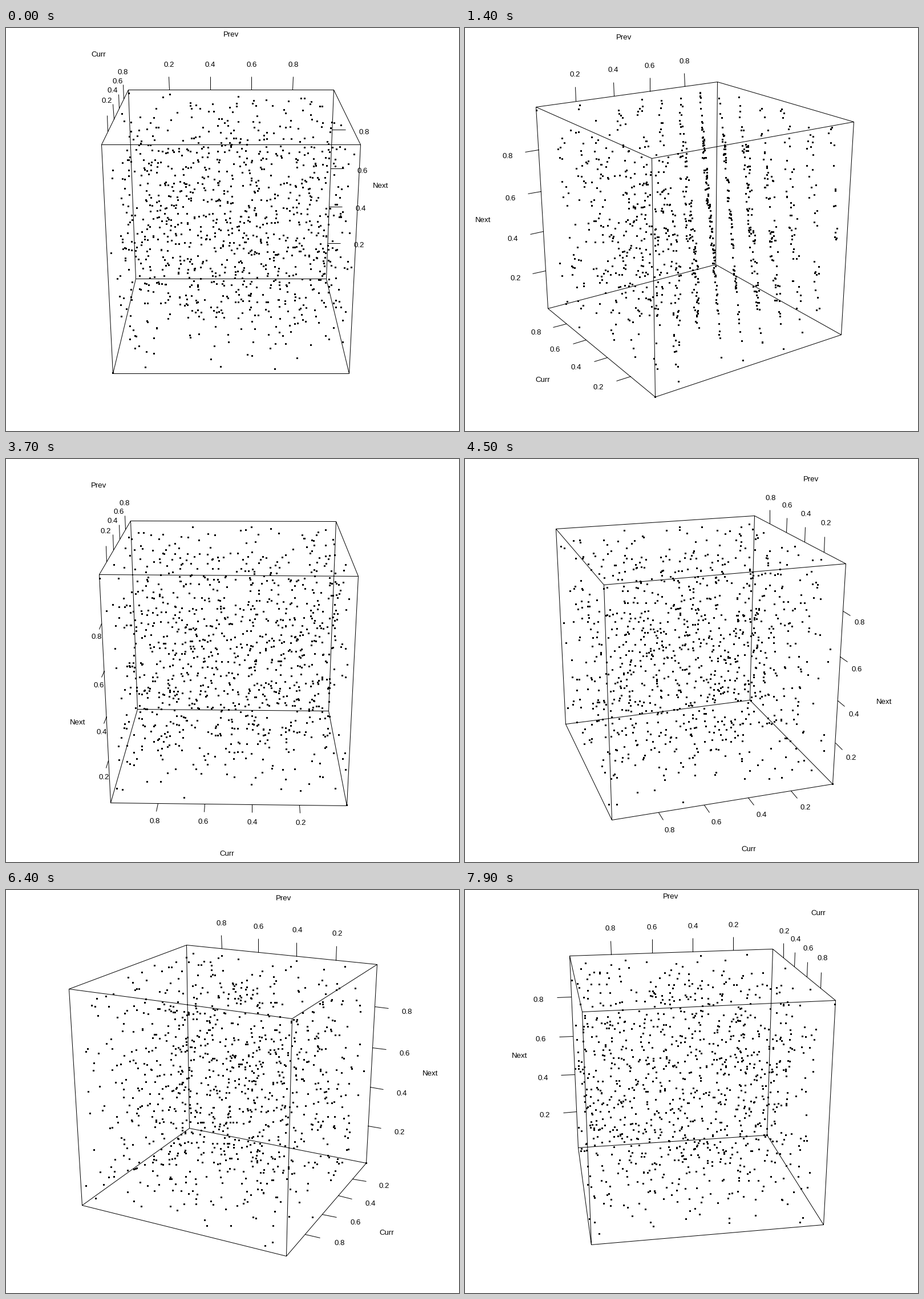
Write a matplotlib script that moves like this. It is 794 px wide and 706 px high and loops after 8 s.

```python
import itertools
import numpy as np
import matplotlib.pyplot as plt
from matplotlib.animation import FuncAnimation

W, H, DPI = 794, 706, 100
FRAMES, INTERVAL = 80, 100
STEP = 2.4                       # degrees per frame
TILT = np.radians(20)
FOCAL, DIST = 1641, 8.52
CX, CY = 394, 339.1
TICK = 2 / 15                    # tick length, the cube spans -1..1
DOT = 3                          # dot size in pixels
HALF, BASE = 9, 6.6              # half label width, baseline drop
NAMES = ("Prev", "Curr", "Next")
MARKS = (0.2, 0.4, 0.6, 0.8)


def randu(rows, stride=5):
    """Triples of successive RANDU values, one triple per `stride` draws."""
    seed, out = 1, []
    for _ in range(rows * stride):
        seed = 65539 * seed % 2**31
        out.append(seed / 2**31)
    return np.array(out).reshape(rows, stride)[:, :3]


def project(p, theta):
    """Perspective view of points (n, 3), turned by theta about the vertical."""
    x, y, z = np.asarray(p, float).T
    c, s = np.cos(theta), np.sin(theta)
    right, depth = x * c - y * s, x * s + y * c
    scale = FOCAL / (DIST + depth * np.cos(TILT) - z * np.sin(TILT))
    up = z * np.cos(TILT) + depth * np.sin(TILT)
    return np.column_stack([CX + right * scale, CY - up * scale])


def axis_edges(theta):
    """For each axis: (facing dim, its side, hidden dim, its side)."""
    x_seen = -1 if np.sin(theta) > 0 else 1
    y_hidden = 1 if np.cos(theta) > 0 else -1
    y_edge = (0, -1, 2, -1) if x_seen < 0 else (2, 1, 0, -1)
    return (2, 1, 1, y_hidden), y_edge, (0, x_seen, 1, y_hidden)


def spot(axis, value, edge, out, side=0.0):
    """Point beside an axis edge, moved outwards in tick lengths."""
    face, fs, hid, hs = edge
    p = np.zeros(3)
    p[axis] = value
    p[face] = fs * (1 + out * TICK)
    p[hid] = hs * (1 + side * TICK)
    return p


def set_segments(line, starts, ends):
    """Show separate strokes with a single line artist."""
    path = np.stack([starts, ends, np.full_like(starts, np.nan)], axis=1)
    line.set_data(*path.reshape(-1, 2).T)


corners = list(itertools.product((-1, 1), repeat=3))
box = [(a, b) for a, b in itertools.combinations(corners, 2)
       if sum(i != j for i, j in zip(a, b)) == 1]
cloud = 2 * randu(1000) - 1

plt.rcParams["path.simplify"] = False
fig = plt.figure(figsize=(W / DPI, H / DPI), dpi=DPI, facecolor="white")
ax = fig.add_axes([0, 0, 1, 1])
ax.set_xlim(-0.5, W - 0.5)       # whole numbers are pixel centres
ax.set_ylim(H - 0.5, -0.5)
ax.axis("off")

PX = 72 / DPI
stroke = dict(color="black", solid_capstyle="butt", snap=False)
lines, = ax.plot([], [], lw=PX, **stroke)
dots, = ax.plot([], [], lw=DOT * PX, **stroke)
font = dict(family="Liberation Sans", size=13.3 * PX, color="black",
            ha="center", va="baseline")
titles = [ax.text(0, 0, name, **font) for name in NAMES]
labels = [[ax.text(0, 0, str(m), **font) for m in MARKS] for _ in NAMES]


def draw(i):
    theta = np.radians(i * STEP)
    at = np.rint(project(cloud, theta))
    set_segments(dots, at - (DOT / 2, 0), at + (DOT / 2, 0))

    segments = list(box)
    for axis, edge in enumerate(axis_edges(theta)):
        x, y = project([spot(axis, 0, edge, 4, 1)], theta)[0]
        titles[axis].set_position((x, y + BASE))
        lean = edge[1] * np.cos(theta) * HALF if edge[0] == 0 else 0
        for label, m in zip(labels[axis], MARKS):
            v = 2 * m - 1
            segments.append((spot(axis, v, edge, 0), spot(axis, v, edge, 1)))
            x, y = project([spot(axis, v, edge, 2)], theta)[0]
            label.set_position((x + lean, y + BASE))
    starts, ends = np.swapaxes(np.array(segments, float), 0, 1)
    set_segments(lines, *(np.rint(project(p, theta)) for p in (starts, ends)))
    return [lines, dots, *titles, *itertools.chain(*labels)]


anim = FuncAnimation(fig, draw, frames=FRAMES, interval=INTERVAL,
                     repeat=True, repeat_delay=0, blit=False)
plt.show()
```
